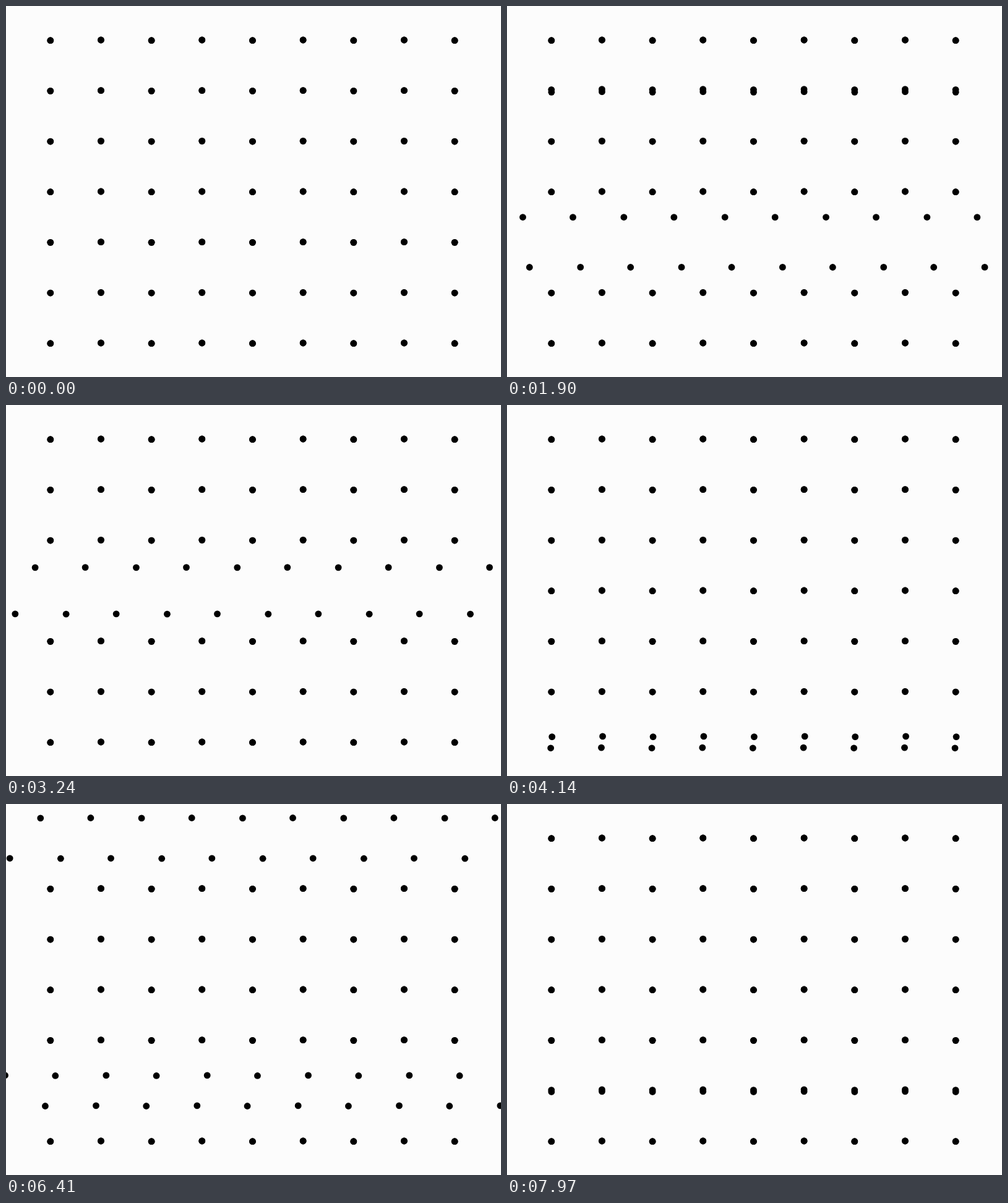
Recreate the animation shown at these times as an HTML page with a canvas. Size 800 by 600 pixels, loop 8 s.

```html
<!DOCTYPE html>
<html lang="en">
<head>
<meta charset="utf-8">
<title>Rolling dots</title>
<style>
  html, body { margin: 0; width: 100%; height: 100%; overflow: hidden; background: #fcfcfc; }
  canvas { display: block; }
</style>
</head>
<body>
<canvas id="stage" width="800" height="600"></canvas>
<script>
const ctx = document.getElementById('stage').getContext('2d');
const LOOP = 8000, FPS = 30;
const GAP = 245 / 3, LEFT = 71.8, TOP = 55.35, DOT = 5.4;
const LEAN = 0.0085; // radians by which neighbouring dots lead or lag

// One half turn per row; row 2 stays still.
const turns = [
  { row: 1, start: 0, duration: 1930 },
  { row: 4, start: 990, duration: 2000 },
  { row: 3, start: 1980, duration: 2000 },
  { row: 6, start: 3990, duration: 2000 },
  { row: 0, start: 4990, duration: 2000 },
  { row: 5, start: 5990, duration: 2000 }
];

// side 1 arcs over to the right, side -1 arcs under to the left.
function drawRow(row, turned, side) {
  for (let col = -2; col <= 10; col++) {
    const angle = turned + (col % 2 ? LEAN : -LEAN) * side;
    const x = LEFT + col * GAP + side * GAP / 2 * (1 - Math.cos(angle));
    const y = TOP + row * GAP - side * GAP / 2 * Math.sin(angle);
    ctx.beginPath();
    ctx.arc(x, y, DOT, 0, Math.PI * 2);
    ctx.fill();
  }
}

function draw(time) {
  ctx.fillStyle = '#fcfcfc';
  ctx.fillRect(0, 0, 800, 600);
  ctx.fillStyle = '#000';
  for (let row = 0; row < 7; row++) {
    const turn = turns.find(t => t.row === row);
    const progress = turn ? (time - turn.start) / turn.duration : 0;
    const turned = progress > 0 && progress < 1 ? progress * Math.PI : 0;
    drawRow(row, turned, 1);
    drawRow(row, turned, -1);
  }
}

function tick() {
  const time = performance.now() % LOOP;
  draw(Math.floor((time + 2) * FPS / 1000) * 1000 / FPS);
  requestAnimationFrame(tick);
}
tick();
</script>
</body>
</html>
```
